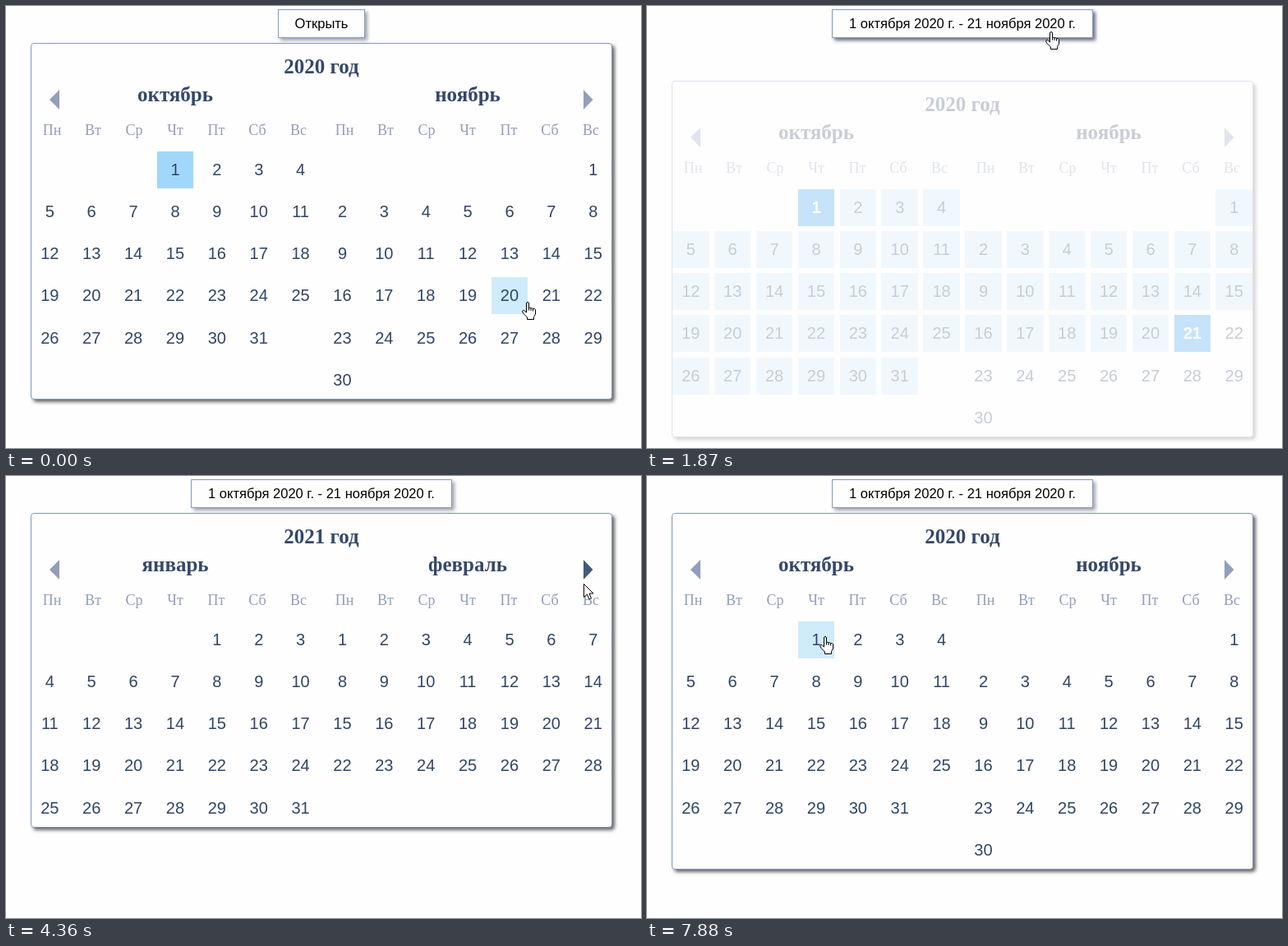
An HTML page that plays this animation: 773 px wide and 538 px high, repeating every 8000 ms.

```html
<!DOCTYPE html>
<html lang="ru">
<head>
<meta charset="utf-8">
<title>Календарь</title>
<style>
  html, body { margin: 0; width: 100%; height: 100%; overflow: hidden; background: #fefefe; }
  svg { display: block; }
  text { text-anchor: middle; font: 20px "Liberation Sans", Arial, sans-serif; }
  .label { font-size: 16.55px; fill: #000; }
  .title { font: bold 25px "Liberation Serif", "Times New Roman", serif; fill: #344869; }
  .weekday { font: 18px "Liberation Serif", "Times New Roman", serif; fill: #929ebb; }
  .frame { fill: #fefefe; stroke: #8799bd; }
  .panel { filter: drop-shadow(3px 3px 2px rgba(0, 0, 0, .6)); }
  .cursor { fill: #fff; stroke: #000; stroke-linejoin: round; }
</style>
</head>
<body>
<svg id="stage" width="773" height="538" viewBox="0 0 773 538"></svg>
<script>
const LOOP = 8000;
const WEEKDAYS = ['Пн', 'Вт', 'Ср', 'Чт', 'Пт', 'Сб', 'Вс'];
const MONTHS = ['январь', 'февраль', 'март', 'апрель', 'май', 'июнь', 'июль',
  'август', 'сентябрь', 'октябрь', 'ноябрь', 'декабрь'];

const INK = [47, 70, 102], WHITE = [255, 255, 255], MUTED = [146, 158, 187];
const PALE = [208, 235, 251], LIGHT = [160, 215, 250], STRONG = [46, 156, 242];

const FADE_OUT = 553, FADE_IN = 1778, FADE_TIME = 500, SLIDE = 62;
const RANGE_SET = 440, RANGE_CLEARED = 5400;

// Month steps: time and the first visible month, counted from October 2020.
const PAGES = [[0, 0], [2900, 1], [3320, 2], [3800, 3], [6440, 2], [6800, 1], [7160, 0]];

// Pointer hotspot: time, x, y.
const POINTER = [
  [40, 633, 360], [140, 662, 352], [1240, 662, 352], [1640, 490, 31], [2060, 490, 31],
  [2450, 700, 120], [2540, 707, 114], [4345, 707, 114], [4360, 703, 130], [4690, 654, 308],
  [5780, 654, 308], [6300, 59, 115], [7220, 59, 115], [7730, 215, 195]
];

const clamp = v => Math.min(1, Math.max(0, v));
const rise = (t, from, to) => clamp((t - from) / (to - from));
const mix = (a, b, k) => a.map((v, i) => v + (b[i] - v) * k);
const rgb = c => `rgb(${c.map(Math.round)})`;
const text = (cls, x, y, s) => `<text class="${cls}" x="${x}" y="${y}">${s}</text>`;

// The CSS "ease" curve.
function ease(x) {
  x = clamp(x);
  let lo = 0, hi = 1;
  for (let i = 0; i < 20; i++) {
    const s = (lo + hi) / 2;
    if (.75 * s * (1 - s) + s ** 3 < x) lo = s; else hi = s;
  }
  return .3 * lo * (1 - lo) ** 2 + 3 * lo * lo * (1 - lo) + lo ** 3;
}

function pointerAt(t) {
  const next = POINTER.findIndex(p => p[0] > t);
  if (next === 0) return POINTER[0].slice(1);
  if (next < 0) return POINTER[POINTER.length - 1].slice(1);
  const [t0, ...from] = POINTER[next - 1], [t1, ...to] = POINTER[next];
  return mix(from, to, Math.sin(rise(t, t0, t1) * Math.PI / 2));
}

const inside = (r, [x, y]) => x >= r.x && x < r.x + r.w && y >= r.y && y < r.y + r.h;

// Share of the last 150 ms the pointer spent over a box: a linear hover fade.
function hover(r, t) {
  let hits = 0;
  for (let i = 0; i < 5; i++) hits += inside(r, pointerAt(t - i * 30));
  return hits / 5;
}

const hiddenAt = t => t < FADE_IN
  ? ease((t - FADE_OUT) / FADE_TIME)
  : 1 - ease((t - FADE_IN) / FADE_TIME);

function dayState(month, day, t, over) {
  const isStart = month === 0 && day === 1;
  const isEnd = month === 1 && day === 21;
  const ranged = t >= RANGE_SET && t < RANGE_CLEARED;
  let fill = null, selected = 0;

  if (isStart && t < RANGE_CLEARED) {
    selected = rise(t, RANGE_SET, 540);
    fill = mix(LIGHT, STRONG, selected);
  } else if (isEnd && t >= 410 && t < RANGE_CLEARED) {
    selected = rise(t, 620, 820);
    fill = mix(mix(PALE, LIGHT, rise(t, 410, 540)), STRONG, selected);
  } else if (ranged && (month === 0 || month === 1 && day < 21)) {
    fill = mix(WHITE, PALE, rise(t, RANGE_SET, 540));
  } else if (month === 4 && day === 20 && t >= RANGE_CLEARED) {
    fill = mix(PALE, LIGHT, rise(t, RANGE_CLEARED, 5550));
  } else if (over) {
    fill = mix(WHITE, PALE, over);
  }
  return { fill, selected };
}

// Cell edges snap to whole pixels.
function monthCells(month, side) {
  const first = new Date(2020, 9 + month, 1);
  const count = new Date(2020, 10 + month, 0).getDate();
  const shift = (first.getDay() + 6) % 7;
  return Array.from({ length: count }, (_, i) => {
    const col = (i + shift) % 7 + side * 7, row = Math.floor((i + shift) / 7);
    const edge = 31 + col * 50.88, x = Math.round(edge);
    return {
      month, day: i + 1, row, x, y: Math.round(177 + row * 51.15),
      w: Math.round(edge + 44.6) - x, h: 45, center: edge + 22.3
    };
  });
}

function drawButton(box, t) {
  const { x, y, w, h } = box;
  const shade = .42 + .25 * hover(box, t);
  const label = t < RANGE_SET ? 'Открыть' : '1 октября 2020 г. - 21 ноября 2020 г.';
  return `<rect class="frame" x="${x + .5}" y="${y + .5}" width="${w - 1}" height="${h - 1}"
    style="filter:drop-shadow(3px 3px 2px rgba(30,40,65,${shade}))"/>` + text('label', 384, 27, label);
}

function drawArrow(box, tip, base, t) {
  const color = rgb(mix(MUTED, [48, 72, 108], hover(box, t)));
  return `<path d="M${base} 102L${tip} 114L${base} 126z" fill="${color}"/>`;
}

function drawCell(cell, t, fading, live) {
  const { x, y, w, h, month, day, center } = cell;
  const { fill, selected } = dayState(month, day, t, live ? hover(cell, t) : 0);
  const bg = fill ? `<rect x="${x}" y="${y}" width="${w}" height="${h}" fill="${rgb(fill)}"/>` : '';
  const weight = fading && selected > .5 ? 'bold' : 'normal';
  return bg + `<text x="${center}" y="${y + 29}" fill="${rgb(mix(INK, WHITE, selected))}"
    style="font-weight:${weight}">${day}</text>`;
}

function drawCursor([x, y], hand) {
  const shape = hand
    ? `<path d="M5.5 13V2q0-1.5 1.5-1.5T8.5 2v5.5q1.5-.7 2.5.5 1.5-.8 2.5.5 2-.5 3 1V15l-2 3.5v3h-8V19
        L2 14.5.7 12q0-2 2-1.5z"/><path d="M8.5 7.5v3M11 8v3M13.5 8.5v3"/>`
    : '<path d="M.5.5v16l4-3.5 2.5 6 2.5-1-2.5-6h5z"/>';
  return `<g class="cursor" transform="translate(${Math.round(x) - (hand ? 5 : 0)} ${Math.round(y)})">${shape}</g>`;
}

function render(t) {
  const month = PAGES.filter(p => p[0] <= t).pop()[1];
  const cells = [...monthCells(month, 0), ...monthCells(month + 1, 1)];
  const rows = Math.max(...cells.map(c => c.row)) + 1;
  const hidden = hiddenAt(t), live = hidden < 1;
  const pointer = pointerAt(t);

  const buttonWidth = t < RANGE_SET ? 106 : 318;
  const button = { x: 384 - buttonWidth / 2, y: 4, w: buttonWidth, h: 35 };
  const left = { x: 52, y: 102, w: 13, h: 24 }, right = { x: 703, y: 102, w: 13, h: 24 };

  let panel = `<rect class="frame panel" x="30.5" y="45.5" width="707" height="${rows === 6 ? 433 : 382}" rx="3.5"/>`;
  panel += text('title', 384, 82, new Date(2020, 9 + month, 1).getFullYear() + ' год');
  for (const side of [0, 1]) {
    panel += text('title', 206 + side * 356, 116, MONTHS[(9 + month + side) % 12]);
    WEEKDAYS.forEach((name, i) => panel += text('weekday', 56 + side * 356 + i * 50, 157, name));
  }
  panel += drawArrow(left, 53, 65, t) + drawArrow(right, 714.5, 703, t);
  panel += cells.map(c => drawCell(c, t, hidden > 0, live)).join('');

  const targets = live ? [button, left, right, ...cells] : [button];
  const hand = targets.some(r => inside(r, pointer));
  document.getElementById('stage').innerHTML = drawButton(button, t) +
    `<g opacity="${1 - hidden}" transform="translate(0 ${Math.round(hidden * SLIDE)})">${panel}</g>` +
    drawCursor(pointer, hand);
}

const begin = performance.now();
function tick() {
  render((performance.now() - begin) % LOOP);
  requestAnimationFrame(tick);
}
tick();
</script>
</body>
</html>
```
